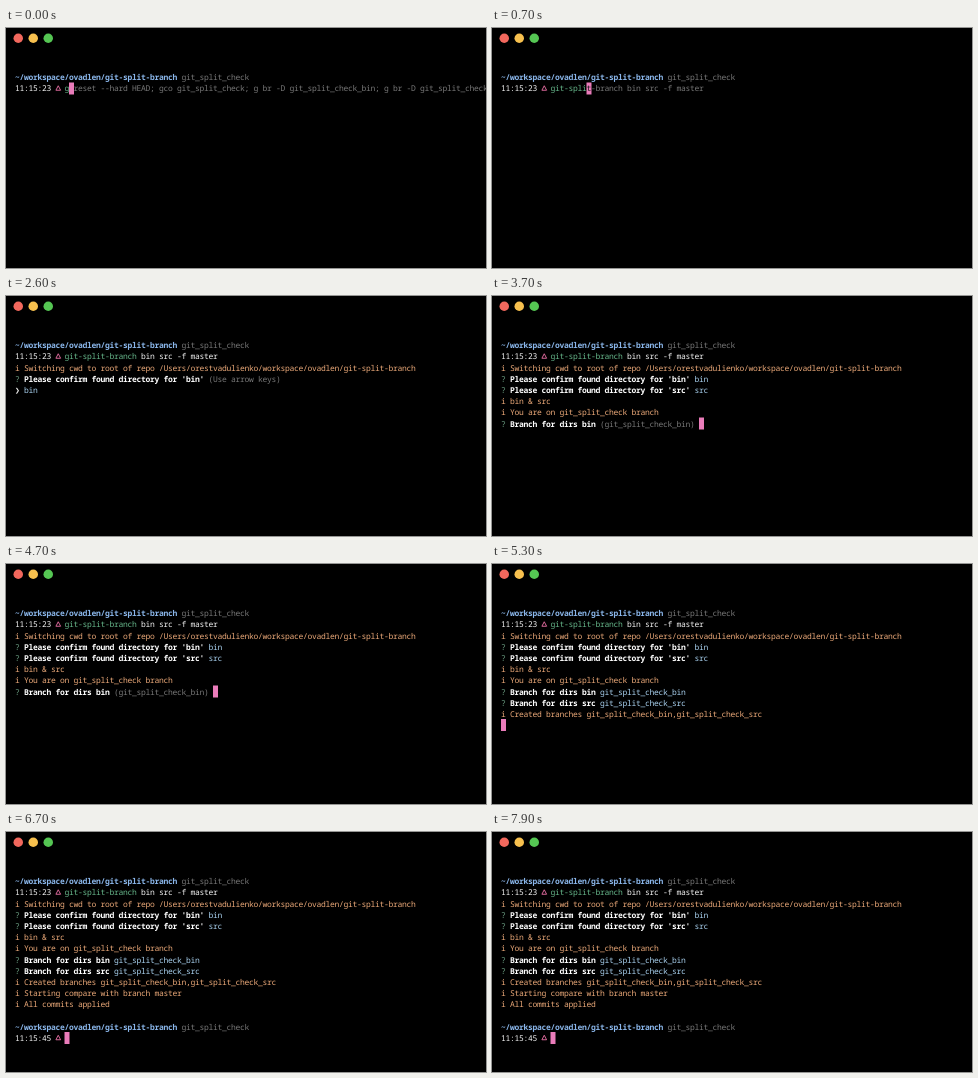
Recreate the animation shown at these times as an HTML page. Size 480 by 240 pixels, loop 8000 ms.

```html
<!DOCTYPE html>
<html lang="en">
<head>
<meta charset="utf-8">
<title>Terminal</title>
<style>
  html, body { margin: 0; width: 100%; height: 100%; overflow: hidden; background: #000; }
  /* Laid out at double size so rows can sit on half pixels. */
  #screen {
    position: absolute; left: 0; top: 0; width: 960px; height: 480px; overflow: hidden;
    transform: scale(.5); transform-origin: 0 0;
    font: 500 16px/22.4px "Noto Sans Mono", "DejaVu Sans Mono", monospace;
    letter-spacing: -.6px;
    font-variant-ligatures: none; text-rendering: geometricPrecision;
    white-space: pre; color: #f4f4f4;
  }
  .dot { position: absolute; top: 11px; width: 19px; height: 19px; border-radius: 50%; }
  .row { position: absolute; left: 18px; }
  #caret { position: absolute; width: 10px; height: 24px; margin: -.5px; background: #ea7cba; }
  .glyph { display: inline-block; width: 9px; }
  .tri { width: 9px; height: 12px; overflow: visible; fill: none; stroke: #ee72a8; stroke-width: 1.8; }
  .path { color: #8ab6ea; font-weight: 600; }
  .dim { color: #777; }
  .cmd { color: #66b68a; }
  .info { color: #eaa878; }
  .mark { color: #6a9c80; }
  .value { color: #a8d0ee; }
  .under { color: #111; }
  b { color: #fff; font-weight: 800; }
</style>
</head>
<body>
<div id="screen">
  <i class="dot" style="left:14.5px;background:#f2685d"></i>
  <i class="dot" style="left:44.5px;background:#f7c04e"></i>
  <i class="dot" style="left:74.5px;background:#55c653"></i>
  <div id="caret"></div>
</div>
<script>
const LOOP = 8000, CELL = 9, LEFT = 18, TOP = 86.7, PITCH = 22.4;
const screen = document.getElementById('screen');
const caret = document.getElementById('caret');

const span = (cls, text) => `<span class="${cls}">${text}</span>`;
const glyph = (cls, ch) => span('glyph ' + cls, ch);
const info = text => glyph('info', 'ℹ') + span('info', ' ' + text);
const ask = (text, rest) => span('mark', '? ') + `<b>${text}</b> ` + rest;
const hint = text => span('dim', `(${text})`);
const value = text => span('value', text);
const pick = text => glyph('', '❯') + value(' ' + text);
const dirAsk = (dir, rest) => ask(`Please confirm found directory for '${dir}'`, rest);
const branchAsk = (dir, rest) => ask(`Branch for dirs ${dir}`, rest);
const cwd = span('path', '~/workspace/ovadlen/git-split-branch') + span('dim', ' git_split_check');
const triangle = '<svg class="tri" viewBox="0 0 9 12"><path d="M5.5 1.5L10.2 10.5H.8Z"/></svg>';
const prompt = time => time + ' ' + glyph('', triangle) + ' ';

const rows = [];
function addRow(line, from, html, to = LOOP) {
  const el = document.createElement('div');
  el.className = 'row';
  el.style.top = TOP + (line - 1) * PITCH + 'px';
  el.innerHTML = html;
  screen.append(el);
  rows.push({ el, from, to });
  return el;
}

const binBranch = 'git_split_check_bin', srcBranch = 'git_split_check_src';
const arrows = hint('Use arrow keys');

addRow(1, 0, cwd);
const input = addRow(2, 0, prompt('11:15:23') + '<span></span>').lastChild;
addRow(3, 2500, info('Switching cwd to root of repo /Users/orestvadulienko/workspace/ovadlen/git-split-branch'));
addRow(4, 2500, dirAsk('bin', arrows), 2900);
addRow(5, 2500, pick('bin'), 2900);
addRow(4, 2900, dirAsk('bin', value('bin')));
addRow(5, 2900, dirAsk('src', arrows), 3300);
addRow(6, 2900, pick('src'), 3300);
addRow(5, 3300, dirAsk('src', value('src')));
addRow(6, 3300, info('bin &amp; src'));
addRow(7, 3300, info('You are on git_split_check branch'));
addRow(8, 3600, branchAsk('bin', hint(binBranch)), 4900);
addRow(8, 4900, branchAsk('bin', value(binBranch)));
addRow(9, 4900, branchAsk('src', hint(srcBranch)), 5200);
addRow(9, 5200, branchAsk('src', value(srcBranch)));
addRow(10, 5200, info(`Created branches ${binBranch},${srcBranch}`));
addRow(11, 5400, info('Starting compare with branch master'));
addRow(12, 6000, info('All commits applied'));
addRow(14, 6100, cwd);
addRow(15, 6100, prompt('11:15:45'));

// Caret stops: time, line, column; line 0 hides it.
const stops = [
  [2000, 3, 0], [2500, 0, 0], [3600, 8, 44], [4900, 9, 44],
  [5200, 11, 0], [5400, 12, 0], [6000, 13, 0], [6100, 15, 11]
];

const program = 'git-split-branch';
const command = program + ' bin src -f master';
const recalled = `g reset --hard HEAD; gco git_split_check; g br -D ${binBranch}; g br -D ${srcBranch}`;
const typedAt = t => t < 1300 ? Math.min(1 + Math.floor(t / 100), 8) : command.length;

function drawInput(count) {
  const ghost = (count === 1 ? recalled : command).slice(count);
  const typed = command.slice(0, count);
  input.innerHTML = span('cmd', typed.slice(0, program.length)) + typed.slice(program.length) +
    span('under', ghost.slice(0, 1)) + span('dim', ghost.slice(1));
}

function moveCaret(t, count) {
  let line = 2, col = 11 + count;
  for (const [at, l, c] of stops) if (t >= at) [line, col] = [l, c];
  caret.style.display = line ? '' : 'none';
  caret.style.left = LEFT + col * CELL + 'px';
  caret.style.top = TOP + (line - 1) * PITCH + 'px';
}

let shown = 0;
function draw() {
  const t = performance.now() % LOOP;
  const count = typedAt(t);
  for (const r of rows) r.el.style.display = t >= r.from && t < r.to ? '' : 'none';
  if (count !== shown) drawInput(shown = count);
  moveCaret(t, count);
  requestAnimationFrame(draw);
}
draw();
</script>
</body>
</html>
```
